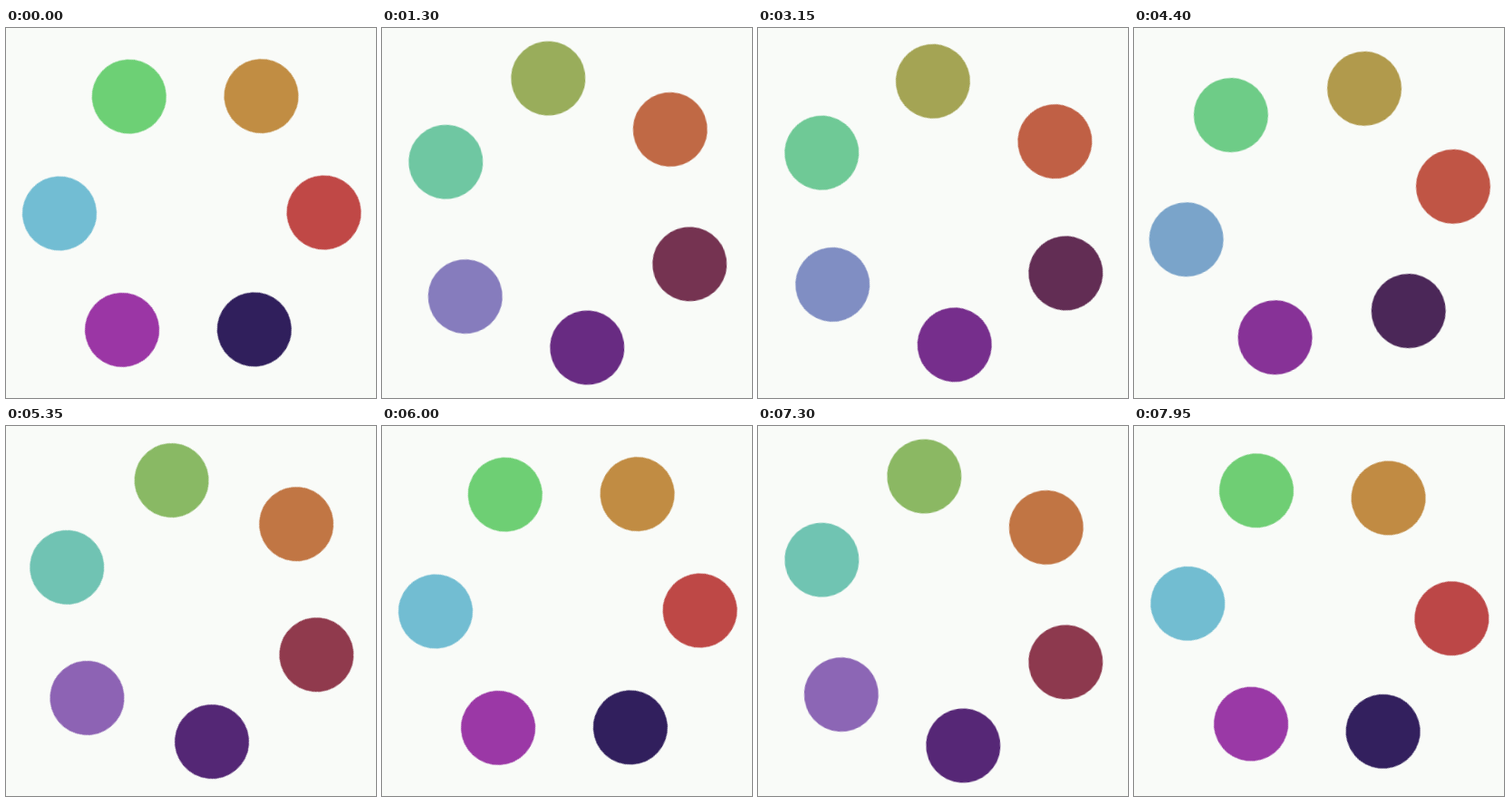
An HTML page for the animation above (8 s loop, 408x408 px).

```html
<!DOCTYPE html>
<html lang="en">
<head>
<meta charset="utf-8">
<title>Turning dots</title>
<style>
  html, body { margin: 0; width: 100%; height: 100%; overflow: hidden; background: #f9fbf8; }
  svg { display: block; width: 100%; height: 100%; }
  #ring { animation: turn 8s linear infinite; }
  #ring circle { animation: tint 8s linear infinite; }

  @keyframes turn {
    from { transform: rotate(-59.2deg); }
    to { transform: rotate(-299.2deg); }
  }
  /* Every dot takes on the colours of the dots ahead of it. */
  @keyframes tint {
    0%, .3% { fill: var(--c0); }
    33.6% { fill: var(--c1); }
    50.3% { fill: var(--c2); }
    75.3% { fill: var(--c3); }
    100% { fill: var(--c4); }
  }
</style>
</head>
<body>
<svg viewBox="0 0 408 408">
  <g transform="translate(204.8 204)"><g id="ring"></g></g>
</svg>
<script>
  const palette = ['#c18d43', '#6dd075', '#72bdd3', '#9b36a5', '#301f5c', '#c04846'];
  const corners = [[150, 0], [75, -125], [-75, -125], [-150, 0], [-75, 125], [75, 125]];
  const ring = document.getElementById('ring');

  corners.forEach(([x, y], i) => {
    const dot = document.createElementNS(ring.namespaceURI, 'circle');
    dot.setAttribute('cx', x);
    dot.setAttribute('cy', y);
    dot.setAttribute('r', 41);
    for (let k = 0; k < 5; k++) {
      dot.style.setProperty('--c' + k, palette[(i + k) % palette.length]);
    }
    ring.append(dot);
  });
</script>
</body>
</html>
```
